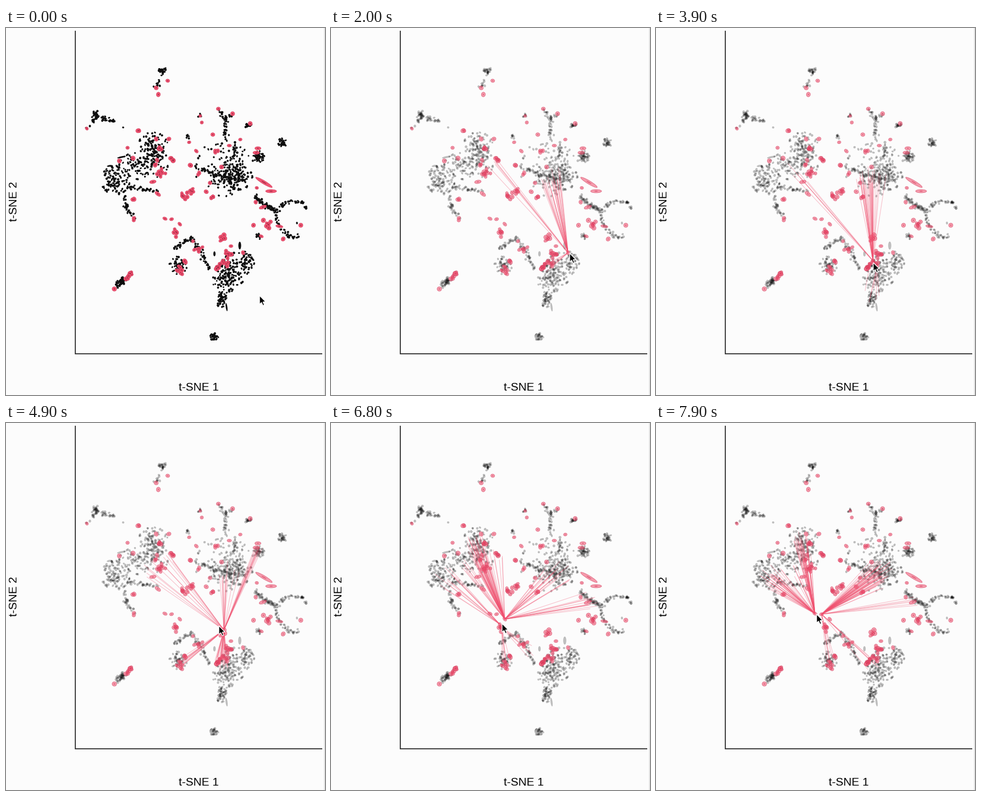
A matplotlib script that plays this animation: 580x668 px, repeating every 8 s.

```python
import numpy as np
import matplotlib.pyplot as plt
from matplotlib.animation import FuncAnimation
from matplotlib.collections import EllipseCollection, LineCollection
from matplotlib.patches import Polygon

W, H, DPI = 580, 668, 100
FRAMES, STEP = 80, 100
PX = 72 / DPI
BG, INK = "#fcfcfc", "#2b2b2b"
PINK, ROSE, BLACK = "#f04f6e", "#d13859", "#0d0d0d"
LEAD = 200          # a fan opens this long before the cursor reaches its stop
MANY, FEW = 26, 6   # links per region
rng = np.random.default_rng(7)


def cloud(x, y, sx, sy, n):
    """Gaussian cluster with its outliers pulled in."""
    p = rng.normal(size=(int(n), 2))
    r = np.hypot(*p.T)[:, None]
    return p * np.minimum(1, 2 / r) * [sx, sy] + [x, y]


def knot(x, y, r, density):
    return cloud(x, y, r, r, density * r * r)


def trail(*pts):
    """Points scattered evenly along a polyline."""
    pts = np.array(pts, float)
    along = np.r_[0, np.cumsum(np.hypot(*np.diff(pts, axis=0).T))]
    s = rng.uniform(0, along[-1], int(along[-1] * 0.68))
    line = np.c_[np.interp(s, along, pts[:, 0]), np.interp(s, along, pts[:, 1])]
    return line + rng.normal(0, 2.2, line.shape)


DOT_KNOTS = [
    (285, 79, 3.8), (164, 158, 3.6), (353, 160, 2), (330, 198, 2),
    (441, 178, 3), (502, 209, 4), (460, 234, 5), (460, 379, 2.6),
    (378, 563, 3.8), (207, 467, 4), (213, 460, 3),
]
DOT_CLOUDS = [
    (410, 272, 19, 12, 185), (398, 258, 27, 24, 85), (267, 218, 14, 14, 110),
    (199, 277, 13, 13, 120), (250, 250, 22, 13, 110), (440, 425, 6, 10, 45),
    (396, 456, 10, 17, 100), (391, 494, 5, 7, 48), (416, 438, 12, 15, 70),
    (313, 432, 8, 8, 52),
]
TRAILS = [
    [(279, 93), (273, 109)], [(148, 182), (164, 160), (200, 172)],
    [(387, 150), (399, 165), (412, 157)], [(399, 165), (398, 205)],
    [(415, 205), (417, 240)], [(343, 251), (385, 270)],
    [(225, 289), (272, 296)], [(214, 305), (221, 330), (232, 347)],
    [(452, 307), (478, 328), (497, 332)], [(458, 312), (494, 335)],
    [(495, 325), (522, 315), (542, 318), (547, 328)],
    [(490, 338), (497, 364), (521, 382), (531, 379)],
    [(303, 406), (303, 402), (338, 381), (370, 437)],
]
LONE = [(213, 181), (361, 217), (529, 355)]
LONG_DOTS = [  # x, y, width, height, angle
    (210, 235, 16, 3, -12), (188, 251, 9, 3, -10), (379, 411, 4, 9, 0),
    (425, 396, 5, 14, 0), (401, 508, 3, 15, -8),
]
SINGLES = [
    (294, 96), (277, 121), (273, 109), (147, 183), (353, 160), (356, 172),
    (386, 147), (412, 156), (444, 174), (376, 194), (426, 203), (406, 214),
    (346, 224), (333, 208), (392, 253), (273, 202), (296, 202), (221, 218),
    (206, 242), (231, 237), (371, 282), (364, 298), (456, 291), (454, 317),
    (468, 350), (450, 359), (536, 359), (504, 384), (464, 379), (289, 347),
    (301, 348), (316, 357), (309, 380), (340, 388), (357, 399), (409, 397),
    (431, 409), (197, 475),
]
PINK_KNOTS = [
    (326, 306, 3.6), (337, 296, 3), (392, 381, 3), (388, 436, 3.8),
    (396, 429, 3.8), (404, 412, 4), (317, 441, 3.6), (328, 425, 2.5),
    (220, 452, 2.6), (226, 447, 2.6), (308, 371, 3), (480, 359, 3.2),
    (348, 404, 2.6), (233, 348, 2), (232, 315, 2), (240, 190, 2),
    (279, 217, 3), (303, 238, 3), (273, 245, 2.4), (282, 264, 4),
    (333, 250, 2), (348, 266, 2), (376, 310, 2.4), (383, 225, 2.4),
]
LONG_PINKS = [
    (469, 281, 35, 6, 31), (482, 297, 20, 6, 0), (467, 326, 14, 6, -20),
    (458, 219, 11, 6, 0), (455, 227, 12, 6, 0), (267, 280, 12, 6, -10),
    (276, 302, 12, 6, 38), (497, 361, 13, 5, 10),
]

REGIONS = dict(
    core=(402, 273, 11), rim=(384, 272, 10), main=(408, 274, 14),
    tree=(398, 176, 4), tuft=(353, 162, 3), crest=(457, 227, 5),
    east=(296, 246, 8), crown=(261, 213, 8), heart=(264, 256, 13),
    wing=(210, 280, 11), shore=(472, 322, 8), isle=(485, 359, 5),
    stem=(393, 437, 7), tail=(392, 486, 7), ring=(319, 437, 4), arc=(356, 416, 7),
)
# Cursor stops: ms, x, y, regions with many links, regions with few.
STOPS = [
    (0, 461, 487, "", ""),
    (600, 458, 375, "", "main isle"),
    (800, 456, 322, "", "main core heart shore"),
    (1000, 470, 280, "", "main core tree tuft crest"),
    (1100, 470, 280, "", "main core tree tuft crest"),
    (1500, 468, 350, "", "main core rim isle shore stem"),
    (2000, 434, 410, "core", "east stem"),
    (2600, 412, 401, "rim", "core east stem"),
    (3100, 394, 408, "rim rim", "stem"),
    (3900, 395, 427, "rim", "core heart tail"),
    (4400, 397, 408, "core", "crest heart stem tail"),
    (4900, 387, 369, "stem", "crest crest core core ring ring heart east"),
    (5400, 355, 398, "", "tree core main ring tail heart"),
    (5900, 340, 393, "", "tree tree main isle ring tail arc stem"),
    (6400, 330, 382, "", "heart crown main core isle tail ring"),
    (6800, 311, 365, "crown heart", "wing wing main main core shore shore ring arc east"),
    (7400, 302, 371, "crown main", "wing wing wing shore ring tail"),
    (7900, 292, 348, "main main crown wing", "heart heart wing shore ring stem"),
]


def with_shape(xy, lo, hi):
    """Append random width, height and angle to each point."""
    n = len(xy)
    return np.c_[xy, rng.uniform(lo, hi, (n, 2)), rng.uniform(0, 180, n)]


def ellipses(rows, z):
    x, y, w, h, angle = rows.T
    return ax.add_collection(EllipseCollection(
        w, h, angle, units="xy", offsets=np.c_[x, y],
        offset_transform=ax.transData, zorder=z), autolim=False)


dots = np.vstack([knot(*k, 2.1) for k in DOT_KNOTS]
                 + [cloud(*c) for c in DOT_CLOUDS]
                 + [trail(*t) for t in TRAILS] + [LONE])
dots = np.vstack([with_shape(dots, 2.7, 4.6), LONG_DOTS])
pinks = np.vstack([SINGLES] + [knot(*k, 0.6) for k in PINK_KNOTS])
pinks = np.vstack([with_shape(pinks, 5, 8.4), LONG_PINKS])
cores = pinks * [1, 1, 0.3, 0.3, 1]


def fan(x, y, many, few):
    """Links from the pink marks under the cursor out to the named regions."""
    ends = [cloud(*REGIONS[name][:2], *REGIONS[name][2:] * 2, n)
            for names, n in ((many, MANY), (few, FEW)) for name in names.split()]
    if not ends:
        return []
    away = np.hypot(pinks[:, 0] - x, pinks[:, 1] - y)
    hubs = pinks[away <= max(10, away.min()), :2]
    return [(hubs[np.hypot(*(hubs - end).T).argmin()], end) for end in np.vstack(ends)]


links = [fan(*stop[1:]) for stop in STOPS]
path = np.array([stop[:3] for stop in STOPS], float)

fig = plt.figure(figsize=(W / DPI, H / DPI), dpi=DPI, facecolor=BG)
ax = fig.add_axes([0, 0, 1, 1])
ax.set(xlim=(0, W), ylim=(H, 0))
ax.axis("off")

ax.plot([125.5, 125.5, 575], [5, 592.5, 592.5], color=INK, lw=1.8 * PX,
        solid_capstyle="butt", solid_joinstyle="miter")
ax.plot([579, 579], [0, H], color="#dcdcdc", lw=1.5 * PX)
label = dict(family="Liberation Sans", size=20.8 * PX, color="black",
             ha="center", va="center")
ax.text(350.5, 655, "t-SNE 1", **label)
ax.text(15, 316, "t-SNE 2", rotation=90, **label)

dot_art = ellipses(dots, 2)
pink_art = ellipses(pinks, 3)
core_art = ellipses(cores, 4)
link_art = ax.add_collection(LineCollection(
    [], colors=[(PINK, 0.36)], linewidths=1.05 * PX, zorder=5), autolim=False)

ARROW = np.array([(0, 0), (0, 16), (3.6, 12.6), (6.2, 18.3), (8.8, 17.2),
                  (6.4, 11.6), (11.2, 11.4)])
cursor = ax.add_patch(Polygon(ARROW, fc="black", ec="white", lw=1.3 * PX, zorder=9))


def draw(frame):
    t = frame * STEP
    stop = max(0, np.searchsorted(path[:, 0] - LEAD, t, side="right") - 1)
    faded = stop > 0
    dot_art.set(facecolor=(BLACK, 0.25 if faded else 1),
                edgecolor=(BLACK, 0.17 if faded else 0), linewidth=0.6 * PX)
    pink_art.set(facecolor=(PINK, 0.56 if faded else 0.97),
                 edgecolor=(ROSE, 0.65 if faded else 0.8), linewidth=0.8 * PX)
    core_art.set(facecolor=(ROSE, 0.6) if faded else ("#8c1f38", 0.75),
                 edgecolor="none")
    link_art.set_segments(links[stop])
    tip = [np.interp(t, path[:, 0], path[:, k]) for k in (1, 2)]
    cursor.set_xy(ARROW + tip)
    return dot_art, pink_art, core_art, link_art, cursor


anim = FuncAnimation(fig, draw, frames=FRAMES, interval=STEP, repeat=True,
                     repeat_delay=0, blit=False)
plt.show()
```
